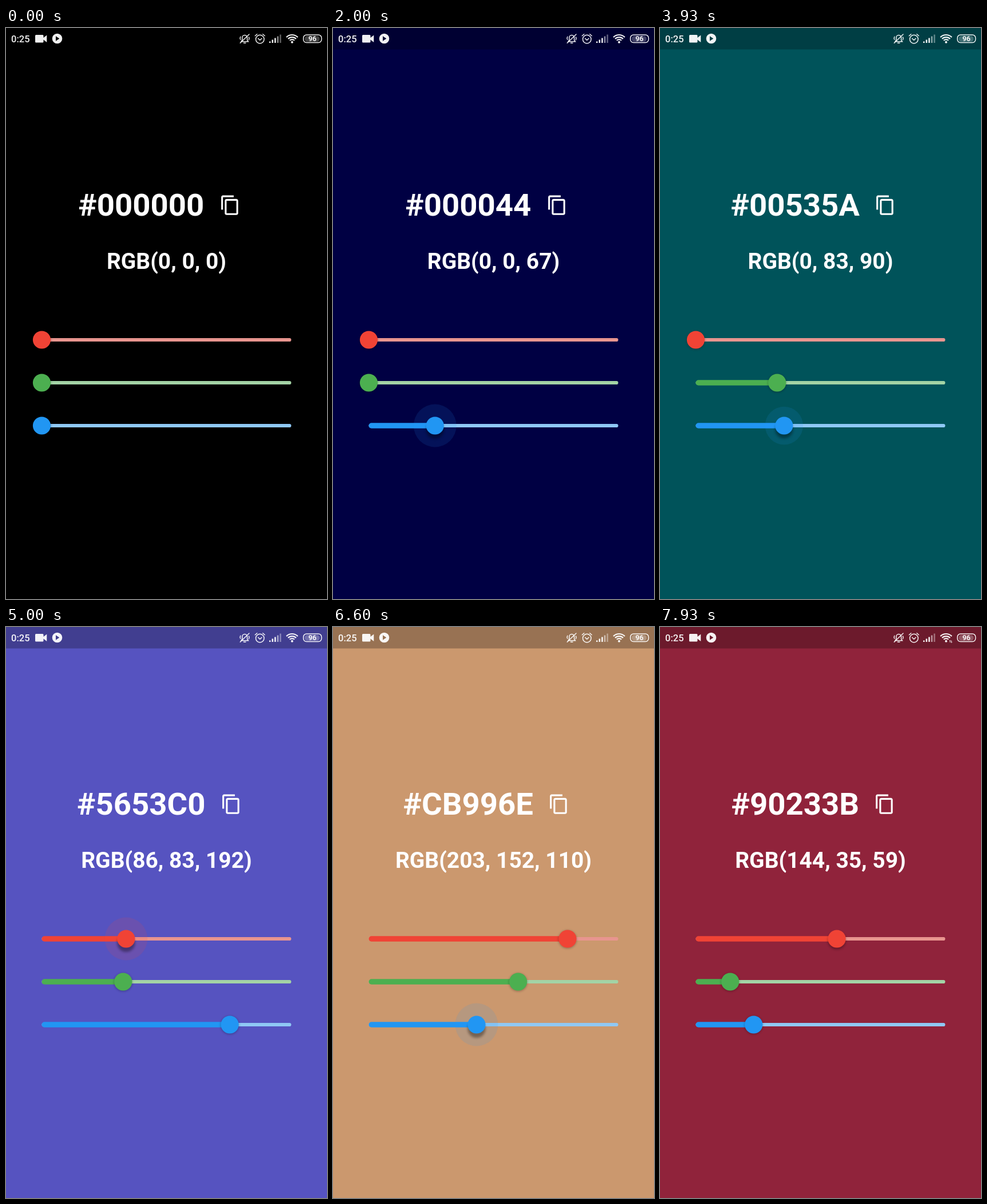
These frames come from a looping animation (561 by 998 pixels, 8 s). An HTML page:

```html
<!DOCTYPE html>
<html lang="en">
<head>
<meta charset="utf-8">
<title>Colour mixer</title>
<style>
  html, body { margin: 0; width: 100%; height: 100%; overflow: hidden; background: #000; }
  body { position: relative; color: #fff; font-family: Roboto, sans-serif; font-weight: 700; }
  #stage { position: absolute; left: 0; top: 0; display: block; }
  .row { position: absolute; left: 0; width: 561px; display: flex; justify-content: center; white-space: pre; }
  #title { top: 276.9px; height: 64px; line-height: 64px; font-size: 54.5px; }
  #title svg { flex: none; margin: 14.1px 24.7px 0 26.4px; }
  #rgb { top: 383.7px; height: 48px; line-height: 48px; font-size: 38.95px; }
</style>
</head>
<body>
<svg id="stage" width="561" height="998" viewBox="0 0 561 998">
  <defs>
    <filter id="soft" x="-50%" y="-50%" width="200%" height="200%"><feGaussianBlur stdDeviation="2"/></filter>
  </defs>
  <rect width="561" height="37.5" fill="#000" opacity=".25"/>
  <g id="status" fill="#fff" opacity=".94">
    <text x="9" y="25" font-size="16.5" font-weight="500">0:25</text>
    <path d="M52.5 12H64q1.500 0 1.500 1.500V17l5.800-4.500v12.500L65.500 20.500V24q0 1.500-1.500 1.500H52.500Q51 25.500 51 24V13.500Q51 12 52.500 12z"/>
    <path fill-rule="evenodd" d="M80.700 18.500a8.800 8.800 0 1 1 17.600 0a8.800 8.800 0 1 1-17.600 0zM87 14.300v8.400l6.300-4.200z"/>
    <g fill="none" stroke="#fff" stroke-width="1.500" stroke-linecap="round">
      <path d="M411 23.800h12.400l-1.800-2.500v-4.300a4.400 4.400 0 0 0-8.800 0v4.300zM415.500 26.300h3.400M409.300 26.300L425 11M409.800 15.300q-1.500 2.400 0 4.800M424.400 16q1.500 2.200 0 4.600"/>
      <circle cx="443.800" cy="19.600" r="7.300"/>
      <path d="M435.400 13.700l3.400-3M452.200 13.700l-3.400-3M440.600 18.300l3.200 3 3.200-3"/>
    </g>
    <g id="bars"></g>
    <path fill="none" stroke="#fff" stroke-width="2.200" d="M490.100 16.100a14 14 0 0 1 19.800 0M493 19a10 10 0 0 1 14 0M495.800 21.800a6 6 0 0 1 8.400 0"/>
    <circle cx="500" cy="24.700" r="2"/>
    <path id="traffic" fill="none" stroke="#fff" d="M507 27v-4l-1 1.300M509.300 23.500v4l1-1.300"/>
    <rect x="522" y="14" width="26" height="10" rx="4.500" opacity=".28"/>
    <rect x="519.700" y="12" width="31.800" height="13.600" rx="5.500" fill="none" stroke="#fff" stroke-width="1.500"/>
    <text x="535.600" y="23.200" font-size="12.500" text-anchor="middle">96</text>
  </g>
  <g id="sliders"></g>
</svg>
<div id="title" class="row"><span id="hex"></span><svg width="37.4" height="37.4" viewBox="0 0 24 24" fill="#fff"><path d="M16 1H4c-1.100 0-2 .9-2 2v14h2V3h12V1zm3 4H8c-1.100 0-2 .9-2 2v14c0 1.100.9 2 2 2h11c1.100 0 2-.9 2-2V7c0-1.100-.9-2-2-2zm0 16H8V7h11v14z"/></svg></div>
<div id="rgb" class="row"></div>
<script>
const LOOP = 8000, STEP = 1000 / 15, LEFT = 62.5, WIDTH = 436;
const $ = id => document.getElementById(id);
const clamp = v => Math.min(1, Math.max(0, v));

// keys: [ms, value]; touches: [down, up]
const channels = [
  { y: 545, color: '#f04335', track: '#e8958f',
    keys: [[4733, 0], [4867, 42], [5000, 86.2], [5200, 150], [5470, 203.2], [7470, 203.2], [7600, 178], [7800, 144.2]],
    touches: [[4690, 5500], [7420, 7850]] },
  { y: 620, color: '#4caf50', track: '#a3d3a5',
    keys: [[2200, 0], [2600, 90], [2900, 165], [3067, 186.7], [3200, 180], [3500, 125], [3733, 83.2],
           [5600, 83.2], [5850, 122], [6130, 152.7], [7000, 152.7], [7200, 90], [7400, 35.2]],
    touches: [[2170, 3770], [5570, 6170], [6970, 7420]] },
  { y: 695, color: '#2196f3', track: '#8fc8f5',
    keys: [[670, 0], [1000, 50], [1400, 105], [1700, 85], [1960, 67.7], [3867, 67.7], [3933, 90.2],
           [4200, 145], [4470, 192.2], [6270, 192.2], [6450, 145], [6600, 110.2], [6750, 85], [6930, 59.2]],
    touches: [[620, 2080], [3867, 4490], [6230, 6960]] }
];

function el(tag, attrs, parent) {
  const node = document.createElementNS('http://www.w3.org/2000/svg', tag);
  set(node, attrs);
  return parent.appendChild(node);
}
function set(node, attrs) {
  for (const name in attrs) node.setAttribute(name, attrs[name]);
}

for (let i = 0; i < 5; i++) {
  const h = 2.5 + i * 3;
  el('rect', { x: 460 + i * 4.6, y: 26 - h, width: 2.5, height: h, opacity: [1, 1, 1, .6, .4][i] }, $('bars'));
}

for (const c of channels) {
  const g = el('g', {}, $('sliders'));
  const line = (stroke, w) => el('line', {
    x1: LEFT + w / 2, x2: LEFT + WIDTH - w / 2, y1: c.y, y2: c.y, stroke, 'stroke-width': w, 'stroke-linecap': 'round'
  }, g);
  line(c.track, 6.2);
  c.active = line(c.color, 9.3);
  c.halo = el('circle', { cy: c.y, fill: c.color, opacity: .12 }, g);
  c.shadow = el('circle', { r: 15.6, fill: '#000', filter: 'url(#soft)' }, g);
  c.thumb = el('circle', { cy: c.y, r: 15.6, fill: c.color }, g);
}

function valueAt(keys, t) {
  const next = keys.findIndex(k => k[0] > t);
  if (next === 0) return keys[0][1];
  if (next < 0) return keys[keys.length - 1][1];
  const [t0, v0] = keys[next - 1], [t1, v1] = keys[next];
  return v0 + (v1 - v0) * (t - t0) / (t1 - t0);
}

function pressAt(touches, t) {
  const amount = Math.max(...touches.map(([down, up]) =>
    Math.min(clamp((t - down) / 100), clamp(1 - (t - up) / 100))));
  return 1 - (1 - amount) ** 2;
}

function draw(t) {
  const values = channels.map(c => {
    const v = valueAt(c.keys, t), p = pressAt(c.touches, t), x = LEFT + WIDTH * v / 255;
    set(c.active, { x2: Math.max(x, LEFT + 4.65), visibility: v > 0 ? 'visible' : 'hidden' });
    set(c.halo, { cx: x, r: 37.4 * p });
    set(c.shadow, { cx: x, cy: c.y + 1 + 6.5 * p, opacity: .3 + .05 * p });
    set(c.thumb, { cx: x });
    return v;
  });
  const whole = values.map(Math.floor).join(', ');
  document.body.style.background = `rgb(${whole})`;
  $('hex').textContent = '#' + values.map(v => Math.round(v).toString(16).padStart(2, '0')).join('').toUpperCase();
  $('rgb').textContent = `RGB(${whole})`;
  const busy = (t > 2950 && t < 3300) || t > 7500;
  $('traffic').setAttribute('visibility', busy ? 'visible' : 'hidden');
}

const start = performance.now();
function tick() {
  const t = (performance.now() - start) % LOOP;
  draw(Math.floor((t + 4) / STEP) * STEP % LOOP);
  requestAnimationFrame(tick);
}
tick();
</script>
</body>
</html>
```
